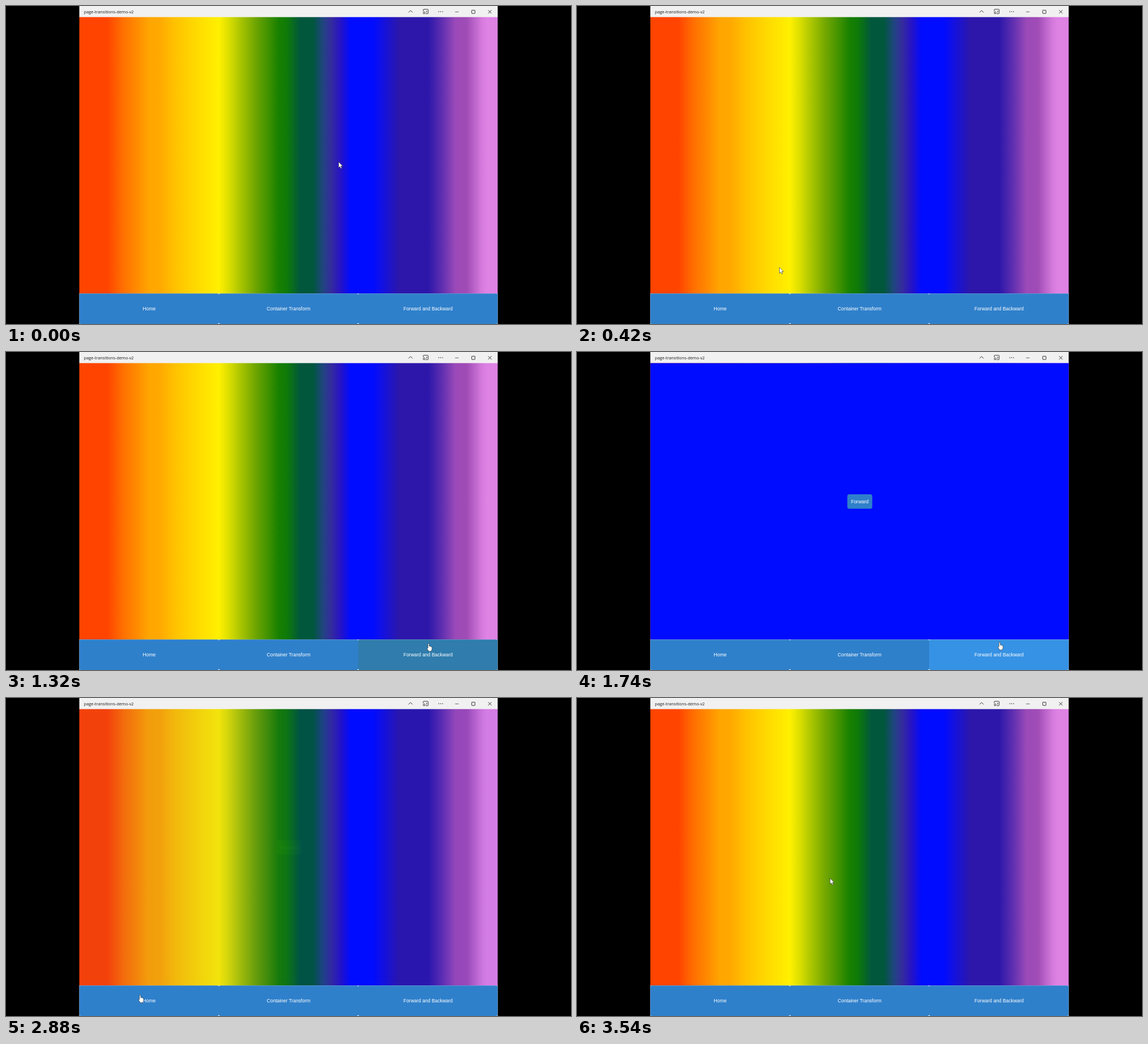
An HTML page for the animation above (3570 ms loop, 998 px wide and 561 px high).

```html
<!DOCTYPE html>
<html lang="en">
<head>
<meta charset="utf-8">
<title>Page transitions</title>
<style>
html, body { margin: 0; width: 100%; height: 100%; overflow: hidden; background: #000; }
svg { display: block; width: 998px; height: 561px; }
.label { font: 8.47px "Liberation Sans", Arial, sans-serif; fill: #fff; text-anchor: middle; }
.title { font: 7.35px "Open Sans", "Noto Sans", sans-serif; fill: #1a1a1a; }
.icon { fill: none; stroke: #222; stroke-width: .9; }
.pointer { fill: #fff; stroke: #222; stroke-width: .6; stroke-linejoin: round; }
</style>
</head>
<body>
<svg viewBox="0 0 998 561">
  <defs><linearGradient id="rainbow" gradientUnits="userSpaceOnUse" x1="129" x2="869" y1="0" y2="0"></linearGradient></defs>
  <rect width="998" height="561" fill="#000"/>
  <rect x="129.5" width="739" height="20" fill="#f1f1f1"/>
  <text class="title" x="137.7" y="12.8">page-transitions-demo-v2</text>
  <g class="icon">
    <path d="M711 11.4L714.6 7.8L718.2 11.4"/>
    <path d="M737 9.3V6.8Q737 5.8 738 5.8H744.7Q745.7 5.8 745.7 6.8V12.6Q745.7 13.6 744.7 13.6H741.6M743 8.2V11.8"/>
    <rect x="737" y="10.6" width="3.2" height="3" rx="1"/>
    <path d="M793.3 10.4H799.5" stroke-width=".7"/>
    <rect x="822.6" y="7.4" width="5.8" height="5.8" rx=".6"/>
    <path d="M851.6 7.2L857.6 13.2M857.6 7.2L851.6 13.2"/>
  </g>
  <g fill="#222"><circle cx="764.5" cy="10" r=".8"/><circle cx="767.8" cy="10" r=".8"/><circle cx="771.1" cy="10" r=".8"/></g>
  <rect x="129.5" y="19.6" width="739" height="488" fill="url(#rainbow)"/>
  <g id="bluePage">
    <rect x="129.5" y="19.6" width="739" height="488" fill="#000cff"/>
    <rect x="477.5" y="251" width="44" height="25.5" rx="3.5" fill="#2f80cb"/>
    <text class="label" x="499.5" y="266.7">Forward</text>
  </g>
  <rect x="129.5" y="507.2" width="739" height="54" fill="#fff"/>
  <g id="nav"></g>
  <path id="arrow" class="pointer" d="M0 0V10.4L2.3 8.2L4 11.8L5.7 11L4.1 7.6H7.4Z"/>
  <path id="hand" class="pointer" d="M-1.2 1Q-1.1 0 -.1 0T1 1V4.6Q2.2 4 2.8 5Q4 4.5 4.5 5.5Q5.8 5.2 5.9 6.6V9.4Q5.8 11.4 4.7 12.2V13.4H-.3V12.4Q-1.2 11.4 -2.9 8.5Q-3.1 7.2 -2 7.3L-1.2 8.2Z"/>
</svg>
<script>
const LOOP = 3570, FADE = 250, TO_BLUE = 1420, TO_HOME = 2700;
const LEFT = 129.5, TAB = 739 / 3, NAV_TOP = 507.2;
const BASE = '#2f80cb', HOVER = '#3692e4', HOVER_DIM = '#2f7cad';
const NS = 'http://www.w3.org/2000/svg';
const $ = id => document.getElementById(id);

function add(parent, tag, attrs, text) {
  const el = document.createElementNS(NS, tag);
  for (const key in attrs) el.setAttribute(key, attrs[key]);
  if (text) el.textContent = text;
  return parent.appendChild(el);
}

const stops = `130 ff4400,179 ff4400,207 ff7000,232 ff8c00,252 ffa500,272 ffa900,
  300 ffc300,340 ffdc00,376 fff000,392 dfe000,415 a8c400,440 70a600,465 3c9000,
  482 178000,496 0f7a08,520 00573c,542 00573c,560 204580,575 352a9e,592 2412c8,
  609 000cff,648 000cff,662 1010e8,694 2c17aa,746 2c17aa,770 5f2fb0,794 9b4ab8,
  814 a04cb6,840 d47adc,849 de82e4,868 de82e4`;
for (const stop of stops.split(',')) {
  const [x, color] = stop.trim().split(' ');
  add($('rainbow'), 'stop', { offset: (x - 129) / 740, 'stop-color': '#' + color });
}

// Whole-pixel inner edges keep neighbouring tabs flush
const edges = [LEFT, 376, 622, LEFT + 739];
const tabs = ['Home', 'Container Transform', 'Forward and Backward'].map((name, i) => {
  const x = edges[i], width = edges[i + 1] - x;
  const rect = add($('nav'), 'rect', { x, y: NAV_TOP, width, height: 53.8, rx: 2.4 });
  add($('nav'), 'text', { class: 'label', x: LEFT + (i + .5) * TAB + .2, y: 537.2 }, name);
  return rect;
});

// Pointer tip: time, x, y
const path = [
  [0, 587.5, 275], [420, 357.5, 461], [600, 252, 521], [800, 252, 521],
  [1220, 746.5, 514.5], [1340, 746.5, 514.5], [1720, 746.5, 512.3], [1840, 746.5, 512.3],
  [2400, 237, 524], [2900, 237, 524], [3200, 238.2, 513], [3260, 238.2, 513], [3540, 447, 318]
];

function pointerAt(t) {
  let i = 1;
  while (i < path.length - 1 && path[i][0] < t) i++;
  const [t0, x0, y0] = path[i - 1], [t1, x1, y1] = path[i];
  const p = Math.min(1, (t - t0) / (t1 - t0));
  const k = p * p * (3 - 2 * p);
  return [x0 + (x1 - x0) * k, y0 + (y1 - y0) * k];
}

function fade(t, start) {
  const p = Math.max(0, Math.min(1, (t - start) / FADE));
  return 1 - Math.pow(1 - p, 2.4);
}

const within = (t, start) => t >= start && t < start + FADE;

function draw(t) {
  $('bluePage').setAttribute('opacity', fade(t, TO_BLUE) - fade(t, TO_HOME));

  const [x, y] = pointerAt(t);
  const onNav = y >= NAV_TOP;
  const live = onNav && !within(t, TO_BLUE) && !within(t, TO_HOME);
  const active = live ? Math.floor((x - LEFT) / TAB) : -1;
  const hover = t < TO_BLUE ? HOVER_DIM : HOVER;
  tabs.forEach((tab, i) => tab.setAttribute('fill', i === active ? hover : BASE));

  const place = `translate(${x} ${y})`;
  $('arrow').setAttribute('transform', place);
  $('hand').setAttribute('transform', place);
  $('arrow').setAttribute('visibility', onNav ? 'hidden' : 'visible');
  $('hand').setAttribute('visibility', onNav ? 'visible' : 'hidden');
}

const start = performance.now();
function tick(now) {
  draw(Math.max(0, now - start) % LOOP);
  requestAnimationFrame(tick);
}
draw(0);
requestAnimationFrame(tick);
</script>
</body>
</html>
```
